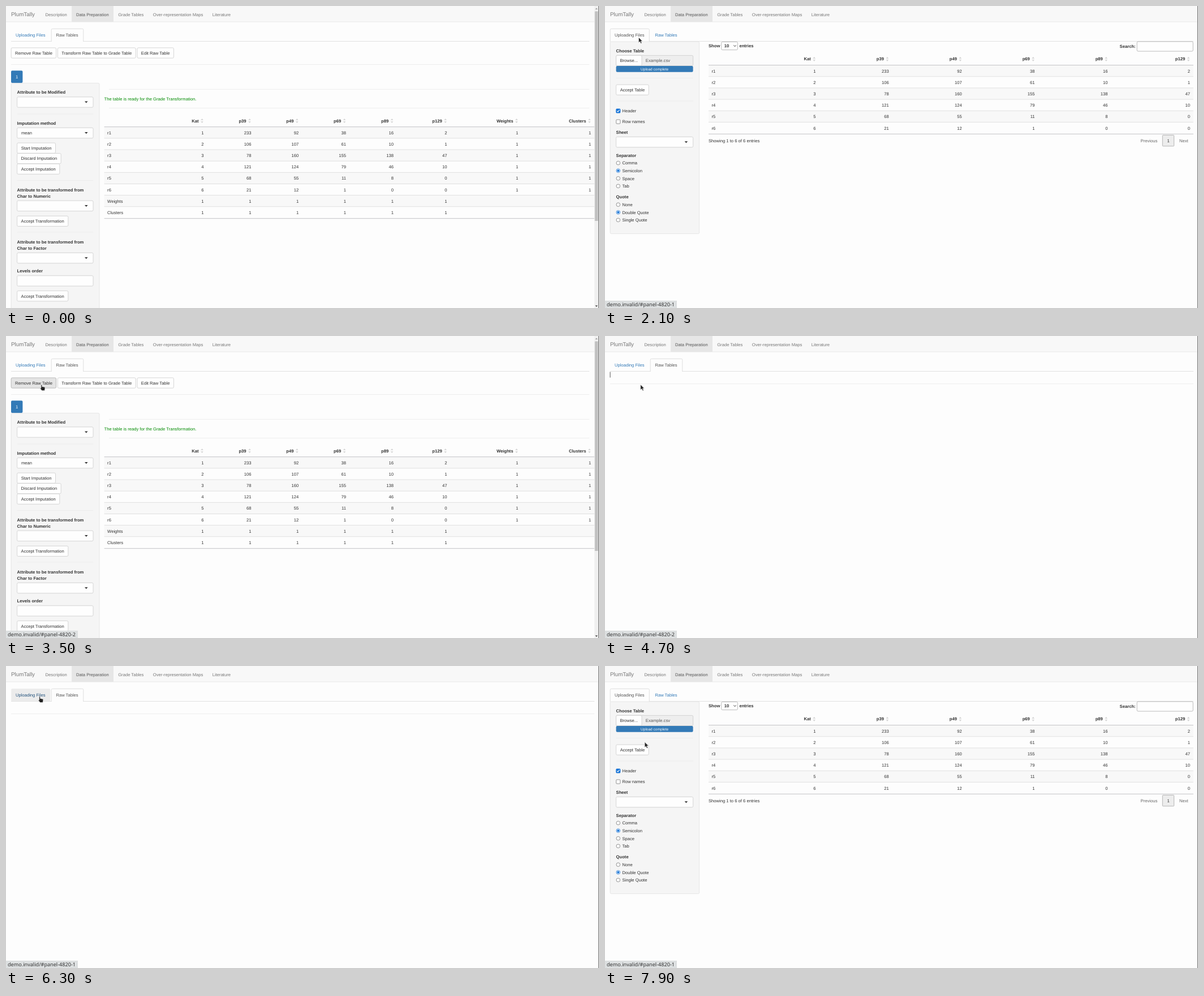
Animation of 1048x534 px, one loop 8000 ms. Source, as an HTML page:

```html
<!DOCTYPE html>
<html lang="en">
<head>
<meta charset="utf-8">
<title>Raw table preparation</title>
<style>
  html, body { margin: 0; width: 100%; height: 100%; overflow: hidden; background: #fdfdfd; }
  svg { display: block; width: 1048px; height: 534px; }
  text { font-family: "Liberation Sans", Arial, sans-serif; text-rendering: geometricPrecision; white-space: pre; }
  .status { font-family: "Noto Sans", "Open Sans", sans-serif; }
</style>
</head>
<body>
<svg id="stage" viewBox="0 0 1048 534"></svg>
<script>
const LOOP = 8000, STEP = 100, SIZE = 7.64;
const BLUE = '#337ab7', INK = '#333', PAPER = '#fefefe';

// Drawing helpers; text is placed by the middle of its capitals.
const box = (x, y, x2, y2, fill, stroke = 'none', r = 0, id = '') =>
  `<rect ${id && `id="${id}"`} x="${x}" y="${y}" width="${x2 - x}" height="${y2 - y}" rx="${r}" fill="${fill}" stroke="${stroke}" stroke-width=".8"/>`;
const label = (x, mid, str, o = {}) => {
  const size = o.size || SIZE;
  return `<text ${o.id ? `id="${o.id}"` : ''} class="${o.cls || ''}" x="${x}" y="${mid + size * 0.36}" font-size="${size}" ` +
    `fill="${o.fill || INK}" text-anchor="${o.anchor || 'start'}" font-weight="${o.bold ? 700 : 400}">${str}</text>`;
};
const bold = (x, mid, str, anchor) => label(x, mid, str, { bold: true, anchor });
const path = (d, fill, stroke = 'none', w = 0.8) =>
  `<path d="${d}" fill="${fill}" stroke="${stroke}" stroke-width="${w}"/>`;
const rule = (x, x2, y, color = '#ececec', h = 0.9) => box(x, y - h / 2, x2, y + h / 2, color);
const button = (x, x2, mid, str, id) =>
  box(x, mid - 9.1, x2, mid + 9.1, PAPER, '#ccc', 2, id) + label((x + x2) / 2, mid, str, { anchor: 'middle' });
const field = (x2, mid) => box(19.6, mid - 9.2, x2, mid + 9.2, PAPER, '#ccc', 2);
const select = (x2, mid, value = '') => field(x2, mid) + label(27, mid, value) +
  path(`M${x2 - 15} ${mid - 1.4}h5.6l-2.8 3z`, INK);
const sortIcon = (x, y) => path(`M${x - 2.3} ${y - 0.9}h4.6l-2.3 -3.2zM${x - 2.3} ${y + 0.9}h4.6l-2.3 3.2z`, '#d6d6d6');

const DATA = [
  [1, 233, 92, 38, 16, 2],
  [2, 106, 107, 61, 10, 1],
  [3, 78, 160, 155, 138, 47],
  [4, 121, 124, 79, 46, 10],
  [5, 68, 55, 11, 8, 0],
  [6, 21, 12, 1, 0, 0]
];
const HEADS = ['Kat', 'p39', 'p49', 'p69', 'p89', 'p129'];

function table(left, top, heads, rights, rows) {
  const right = 1039.8, pitch = 20.15;
  let out = '';
  heads.forEach((h, i) => {
    out += bold(rights[i] - 8.8, top - 10.9, h, 'end') + sortIcon(rights[i] - 2.9, top - 10.7);
  });
  rows.forEach(([name, ...cells], n) => {
    const y = top + n * pitch;
    if (n % 2 === 0) out += box(left, y, right, y + pitch, '#f8f8f8');
    if (n) out += rule(left, right, y, '#dedede');
    out += label(left + 5.5, y + 10.4, name);
    cells.forEach((c, i) => { out += label(rights[i], y + 10.4, c, { anchor: 'end' }); });
  });
  return out + rule(left, right, top, '#c2c2c6', 1) + rule(left, right, top + rows.length * pitch + 0.8, '#c2c2c6', 1);
}

function tabs(active, lineEnd) {
  const [x, x2] = active === 1 ? [9.2, 78.3] : [80.2, 136.8];
  const other = active === 1 ? [80.2, 136.8] : [9.2, 78.3];
  const tint = n => (n === active ? '#555' : BLUE);
  return rule(9, lineEnd, 62.4, '#ddd') +
    path(`M${other[0]} 62V42q0 -2 2 -2H${other[1] - 2}q2 0 2 2V62z`, 'none').replace('<path', '<path class="tab"') +
    path(`M${x} 63V42.3q0 -2 2 -2H${x2 - 2}q2 0 2 2V63`, '#fdfdfd', '#d9d9d9') +
    label(17, 51.2, 'Uploading Files', { fill: tint(1) }).replace('<text', '<text data-tab="1"') +
    label(88.4, 51.2, 'Raw Tables', { fill: tint(2) }).replace('<text', '<text data-tab="2"');
}

function navbar() {
  const items = [[69.6, 'Description'], [124, 'Data Preparation'], [198.2, 'Grade Tables'],
    [259.8, 'Over-representation Maps'], [364.8, 'Literature']];
  return box(0, 0, 1048, 28, '#f8f8f8') + rule(0, 1048, 28, '#e6e6e6') + box(116, 0, 190, 28, '#e6e6e6') +
    label(9, 14.5, 'PlumTally', { size: 9.82, fill: '#777' }) +
    items.map(([x, s], i) => label(x, 14.8, s, { fill: i === 1 ? '#555' : '#777' })).join('');
}

function rawPage() {
  const rows = DATA.map((r, i) => ['r' + (i + 1), ...r, 1, 1]);
  for (const name of ['Weights', 'Clusters']) rows.push([name, 1, 1, 1, 1, 1, 1]);
  const side = box(9.2, 136.4, 165, 540, '#f5f5f5', '#e1e1e1', 2) +
    bold(19.6, 152.7, 'Attribute to be Modified') + select(154, 170) +
    bold(19.6, 207.3, 'Imputation method') + select(154, 224.5, 'mean') +
    button(19.6, 87.5, 251.2, 'Start Imputation') +
    button(19.6, 97.2, 269.7, 'Discard Imputation') +
    button(19.6, 94.8, 288.2, 'Accept Imputation') +
    bold(19.6, 325.3, 'Attribute to be transformed from') + bold(19.6, 336.2, 'Char to Numeric') + select(154, 353.4) +
    button(19.6, 109.8, 380.4, 'Accept Transformation') +
    bold(19.6, 417.5, 'Attribute to be transformed from') + bold(19.6, 428.4, 'Char to Factor') + select(154, 445.6) +
    bold(19.6, 468.6, 'Levels order') + field(154, 486) +
    button(19.6, 109.8, 512.8, 'Accept Transformation') +
    [191, 308.5, 400].map(y => rule(19.6, 154, y)).join('');
  const scrollbar = box(1039.8, 0, 1048, 534, '#f0f0f0') + box(1040.6, 9.5, 1046.4, 380, '#c1c1c1') +
    path('M1041.2 6h4.6l-2.3 -2.6z', '#a0a0a0') + path('M1041.2 529.4h4.6l-2.3 2.6z', '#444');
  return tabs(2, 1031) +
    button(9.2, 88.6, 83, 'Remove Raw Table', 'remove') +
    button(91.4, 229.2, 83, 'Transform Raw Table to Grade Table', 'transform') +
    button(232, 296.4, 83, 'Edit Raw Table', 'edit') +
    rule(9, 1031, 103.4) + box(9, 114.2, 29.4, 136, BLUE, 'none', 2) +
    label(19.2, 125.2, '1', { fill: '#fff', anchor: 'middle' }) + side +
    rule(182, 1031, 147.2) + label(173.6, 164.1, 'The table is ready for the Grade Transformation.', { fill: '#008a00' }) +
    rule(182, 1031, 180.5) +
    table(173.6, 213.7, [...HEADS, 'Weights', 'Clusters'], [349.4, 433.4, 517.2, 601, 685, 779.5, 905.2, 1034], rows) +
    scrollbar;
}

const radio = (mid, str, on) =>
  `<circle cx="23.3" cy="${mid}" r="3.3" fill="#fff" stroke="${on ? '#1673d6' : '#777'}" stroke-width=".8"/>` +
  (on ? `<circle cx="23.3" cy="${mid}" r="2" fill="#1673d6"/>` : '') + label(30.4, mid, str);

function uploadPage() {
  const side = box(9.2, 63, 166.6, 402.6, '#f5f5f5', '#e1e1e1', 2) +
    bold(19.6, 79, 'Choose Table') +
    box(19.6, 87.4, 155.6, 105.6, '#eee', '#ccc', 2) + button(19.6, 65, 96.5, 'Browse...') +
    label(71.8, 96.6, 'Example.csv', { fill: '#555' }) +
    box(19.6, 106, 155.6, 116.7, BLUE, 'none', 2) +
    label(87.6, 111.4, 'Upload complete', { size: 6.55, fill: '#fff', anchor: 'middle' }) +
    rule(19.6, 155.6, 127.5) + button(19.6, 77.2, 148.2, 'Accept Table') + rule(19.6, 155.6, 168) +
    box(19.8, 181.9, 26.9, 189, '#1673d6', '#1673d6', 1) + path('M21.2 185.5l1.6 1.7l2.9 -3.6', 'none', '#fff', 1.1) +
    label(30.4, 185.5, 'Header') +
    box(19.8, 201, 26.9, 208.1, '#fff', '#777', 1) + label(30.4, 204.6, 'Row names') +
    bold(19.6, 223.6, 'Sheet') + select(155.6, 240.6) +
    bold(19.6, 264, 'Separator') +
    ['Comma', 'Semicolon', 'Space', 'Tab'].map((s, i) => radio(277.6 + i * 13.6, s, i === 1)).join('') +
    bold(19.6, 337.6, 'Quote') +
    ['None', 'Double Quote', 'Single Quote'].map((s, i) => radio(351.2 + i * 13.6, s, i === 1)).join('');
  return tabs(1, 1040) + side +
    bold(183, 70.6, 'Show') + box(205.7, 63.4, 234.4, 77.6, PAPER, '#aaa', 2) + bold(210.8, 70.6, '10') +
    path('M227.4 69.4l2.1 2.2l2.1 -2.2', 'none', INK, 1) + bold(237.4, 70.6, 'entries') +
    bold(937.6, 71.6, 'Search:', 'end') + box(940.2, 62.9, 1039.2, 80, PAPER, '#aaa', 2) +
    table(183, 104.6, HEADS, [372.6, 501.8, 630.8, 759.6, 888.6, 1034], DATA.map((r, i) => ['r' + (i + 1), ...r])) +
    label(183, 238, 'Showing 1 to 6 of 6 entries') +
    label(946.6, 238.2, 'Previous', { fill: '#666' }) +
    box(985.3, 228.4, 1005.6, 247.8, '#ededed', '#a4a4a4', 1) + label(995.5, 238.2, '1', { anchor: 'middle' }) +
    label(1015, 238.2, 'Next', { fill: '#666' });
}

const emptyPage = () => tabs(2, 1040) + rule(9, 1040, 84.6) +
  box(8.7, 63.5, 9.5, 73.5, '#333', 'none', 0, 'caret');

const ARROW = path('M0 0V9.2L2.2 7.3L3.9 10.8L5.5 10L3.8 6.7H6.6z', '#222', '#fff', 0.5);
const HAND = path('M-.9 .7Q0 -.6 .9 .7V3.6L4.9 4.2Q6.3 4.5 6.2 6L5.5 10.5H.6L-2.2 6.9Q-2.4 5.6 -.9 6.2z', '#222', '#fff', 0.5);

document.getElementById('stage').innerHTML =
  box(0, 0, 1048, 534, '#fdfdfd') + navbar() +
  `<g id="raw">${rawPage()}</g><g id="upload">${uploadPage()}</g><g id="empty">${emptyPage()}</g>` +
  box(1046.9, 0, 1048, 534, '#777') +
  `<g id="status">${box(0, 521, 127, 534, '#dcdfe0')}${label(3, 527.8, '', { size: 9.1, cls: 'status', id: 'address' })}</g>` +
  `<g id="cursor"><g id="arrow">${ARROW}</g><g id="hand">${HAND}</g></g>`;

const el = id => document.getElementById(id);
const show = (node, on) => node.setAttribute('visibility', on ? 'inherit' : 'hidden');

// Steps: [start time, value]
const PAGES = [[0, 'raw'], [2100, 'upload'], [3000, 'raw'], [4700, 'empty'], [6500, 'upload']];
const STATUS = [[0, 0], [1900, 1], [2800, 2], [5900, 1]];
const TRACK = [[1000, 214, 104], [1300, 200, 75.6], [1500, 200, 75.6], [1900, 59.5, 55.5], [2600, 59.5, 55.5],
  [2900, 104, 52], [3000, 104, 52], [3400, 62.8, 86], [4700, 62.8, 86], [5000, 69.8, 81.4], [5400, 69.8, 81.4],
  [6100, 59.6, 54], [7000, 59.6, 54], [7700, 70.2, 134.6]];
const ZONES = { remove: [9, 74, 89, 92], transform: [91, 74, 229, 92], edit: [232, 74, 296, 92] };
const TABS = [[9, 40, 78, 62], [80, 40, 137, 62]];

const valueAt = (steps, t) => steps.filter(s => s[0] <= t).pop()[1];
const inside = ([x, y, x2, y2], p) => p[0] >= x && p[0] <= x2 && p[1] >= y && p[1] <= y2;

function cursorAt(t) {
  const i = TRACK.findIndex(k => k[0] > t);
  if (i < 0) return TRACK[TRACK.length - 1].slice(1);
  if (i === 0) return null;
  const [t0, x0, y0] = TRACK[i - 1], [t1, x1, y1] = TRACK[i];
  const p = (t - t0) / (t1 - t0), e = p * p * (3 - 2 * p);
  return [x0 + (x1 - x0) * e, y0 + (y1 - y0) * e];
}

function render(t) {
  const page = valueAt(PAGES, t), status = valueAt(STATUS, t), pos = cursorAt(t);
  for (const id of ['raw', 'upload', 'empty']) show(el(id), id === page);
  show(el('caret'), page === 'empty' && t < 5600);

  show(el('status'), status > 0);
  el('address').textContent = 'demo.invalid/#panel-4820-' + status;

  let link = false;
  for (const id in ZONES) {
    const over = page === 'raw' && pos && inside(ZONES[id], pos);
    el(id).setAttribute('fill', over ? '#e4e4e4' : PAPER);
    el(id).setAttribute('stroke', over ? '#adadad' : '#ccc');
    link = link || over;
  }
  const idle = page === 'upload' ? 2 : 1;
  const overTab = pos && inside(TABS[idle - 1], pos);
  el(page).querySelector('.tab').setAttribute('fill', overTab ? '#ececec' : 'none');
  el(page).querySelector(`[data-tab="${idle}"]`).setAttribute('fill', overTab ? '#23527c' : BLUE);
  link = link || overTab;

  show(el('cursor'), pos);
  if (pos) el('cursor').setAttribute('transform', `translate(${pos[0]} ${pos[1]})`);
  show(el('arrow'), !link);
  show(el('hand'), link);
}

const start = performance.now();
function tick() {
  const t = (performance.now() - start) % LOOP;
  render(Math.floor(t / STEP) * STEP);
  requestAnimationFrame(tick);
}
tick();
</script>
</body>
</html>
```
